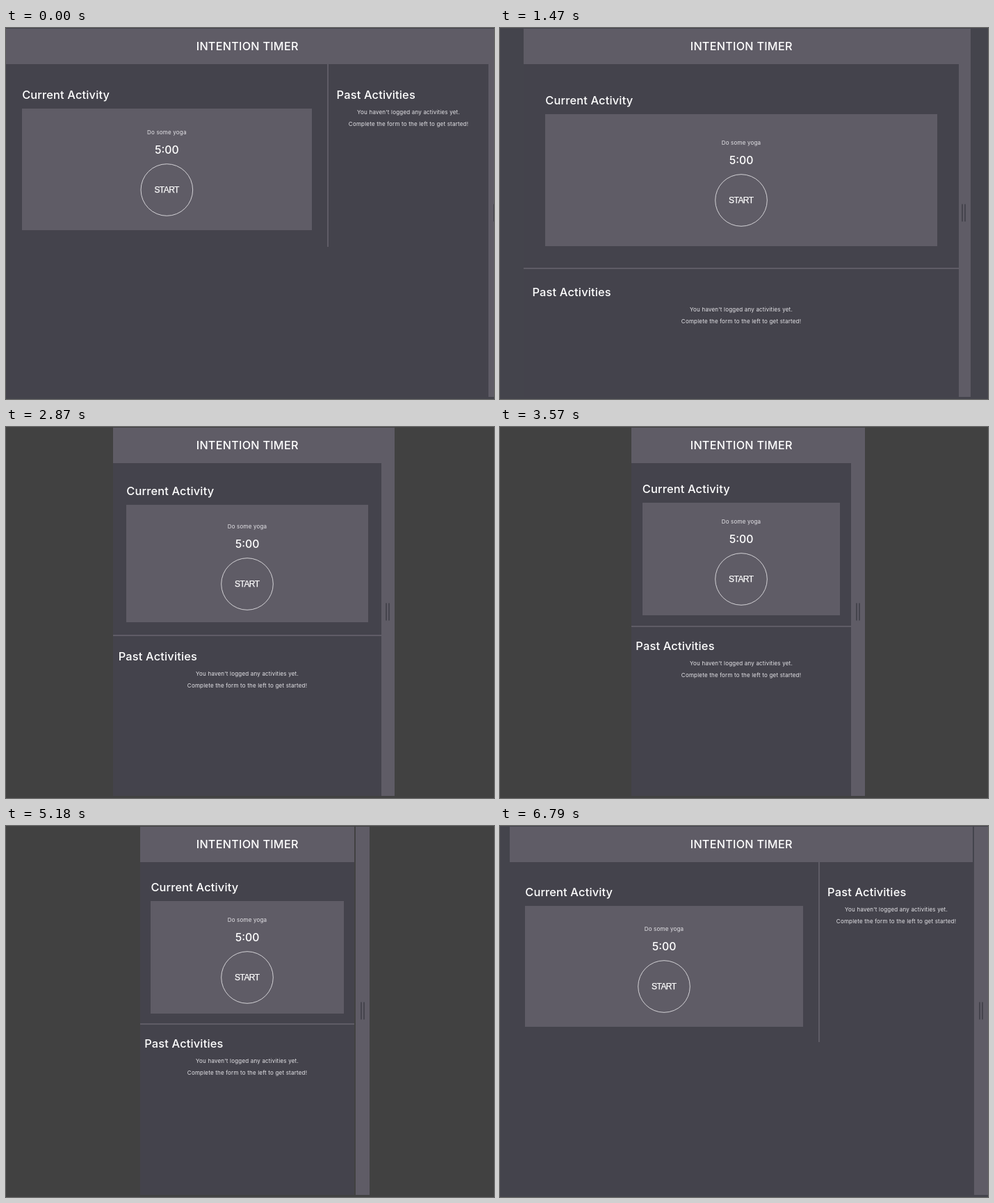
Recreate the animation shown at these times as an HTML page. Size 702 px wide and 534 px high, loop 6860 ms.

```html
<!DOCTYPE html>
<html lang="en">
<head>
<meta charset="utf-8">
<title>Intention Timer</title>
<style>
  html, body { margin: 0; width: 100%; height: 100%; overflow: hidden; background: #414141; }
  svg { display: block; width: 702px; height: 534px; }
  text { font-family: Inter, "Open Sans", sans-serif; fill: #fff; }
  .head { font-size: 16.4px; font-weight: 500; letter-spacing: .16px; }
  .title { font-size: 16.2px; font-weight: 500; letter-spacing: .25px; }
  .clock { font-size: 15.8px; font-weight: 500; }
  .small { font-size: 8px; letter-spacing: .19px; fill: #e6e5e9; }
  .start { font: 12px "Liberation Sans", Arial, sans-serif; letter-spacing: -.55px; stroke: #fff; stroke-width: .25px; }
  .mid { text-anchor: middle; }
  .panel { fill: #5f5c66; }
</style>
</head>
<body>
<svg viewBox="0 0 702 534">
  <rect id="back" width="702" height="534"/>
  <g id="bar">
    <rect id="grip" y="1" width="20" height="530"/>
    <path id="lines" d="M8 253.5v25M12 253.5v25" stroke-width="2"/>
  </g>
  <rect id="page" y="1" height="530" fill="#44434c"/>
  <rect id="header" class="panel" y="1" height="51"/>
  <text class="title mid" x="347.2" y="32">INTENTION TIMER</text>
  <rect id="rule" class="panel"/>
  <text id="current" class="head">Current Activity</text>
  <rect id="card" class="panel"/>
  <g id="timer">
    <text class="small mid" y="16">Do some yoga</text>
    <text class="clock mid" y="44">5:00</text>
    <circle cy="96" r="37.3" fill="none" stroke="#e0dfe3" stroke-width=".9"/>
    <text class="start mid" x="-.2" y="100">START</text>
  </g>
  <text id="past" class="head">Past Activities</text>
  <g id="empty">
    <text class="small mid">You haven't logged any activities yet.</text>
    <text class="small mid" y="17.3">Complete the form to the left to get started!</text>
  </g>
</svg>
<script>
const LOOP = 6860, STEP = 70, CENTER = 347, BREAKPOINT = 650;

// [time, page width]
const widths = [
  [770, 694], [1470, 626], [2170, 536], [2870, 386], [3570, 316], [4270, 256],
  [4340, 254], [4620, 250], [4900, 250], [5180, 308], [5950, 474], [6790, 666]
];
// [time, distance of the drag bar from the page edge]
const gaps = [
  [770, 0], [910, -3], [1470, -3], [2170, -2], [2870, -1], [4340, 0],
  [4900, 0], [5040, 2], [5180, 2], [5950, 3], [6790, 2]
];

const el = {};
document.querySelectorAll('[id]').forEach(n => el[n.id] = n);

function set(node, attrs) {
  for (const k in attrs) node.setAttribute(k, attrs[k]);
}

function move(node, x, y) {
  set(node, { transform: `translate(${x} ${Math.round(y)})` });
}

function box(node, left, top, right, bottom) {
  const [l, t, r, b] = [left, top, right, bottom].map(Math.round);
  set(node, { x: l, y: t, width: r - l, height: b - t });
}

function slope(keys, i) {
  if (i < 0 || i > keys.length - 2) return 0;
  return (keys[i + 1][1] - keys[i][1]) / (keys[i + 1][0] - keys[i][0]);
}

// Tangent that never overshoots; the last key keeps its speed
function tangent(keys, i) {
  if (i === keys.length - 1) return slope(keys, i - 1);
  const a = slope(keys, i - 1), b = slope(keys, i);
  return a * b > 0 ? 2 * a * b / (a + b) : 0;
}

function sample(keys, t) {
  const last = keys.length - 1;
  if (t <= keys[0][0]) return keys[0][1];
  if (t >= keys[last][0]) return keys[last][1];
  const i = keys.findIndex(k => k[0] > t) - 1;
  const [t0, v0] = keys[i], [t1, v1] = keys[i + 1];
  const h = t1 - t0, u = (t - t0) / h, w = 1 - u;
  return v0 * w * w * (1 + 2 * u) + v1 * u * u * (3 - 2 * u)
    + h * u * w * (tangent(keys, i) * w - tangent(keys, i + 1) * u);
}

function draw(t) {
  const w = sample(widths, t);
  const left = CENTER - w / 2, right = CENTER + w / 2;
  const wide = w > BREAKPOINT;
  const col = wide ? w * 2 / 3 : w;
  const gray = w < 290;

  set(el.back, { fill: w > 580 ? '#44444c' : '#414141' });
  set(el.grip, { fill: gray ? '#606060' : '#5f5c66' });
  set(el.lines, { stroke: gray ? '#454545' : '#45444d' });
  move(el.bar, Math.round(right + sample(gaps, t)), 0);
  box(el.page, left, 1, right, 531);
  box(el.header, left, 1, right, 52);

  const cardLeft = left + col * .05, cardTop = 93 + col * .05;
  const end = 226.6 + col * .19;
  box(el.card, cardLeft, cardTop, cardLeft + col * .9, 226.6 + col * .14);
  move(el.current, cardLeft, cardTop - 14);
  move(el.timer, left + col / 2, cardTop + col * .045);

  if (wide) {
    const x = Math.floor(left + col);
    box(el.rule, x, 52, x + 2, end);
    move(el.past, x + 2 + (w - col) * .05, cardTop - 14);
    move(el.empty, (x + 2 + right) / 2, cardTop + 8);
  } else {
    const y = end + w * .02;
    box(el.rule, left, end - .9, right, end + 1);
    move(el.past, left + w * .02, y + 28);
    move(el.empty, CENTER, y + 50);
  }
}

function tick() {
  draw(Math.floor(performance.now() % LOOP / STEP) * STEP);
  requestAnimationFrame(tick);
}
tick();
</script>
</body>
</html>
```
